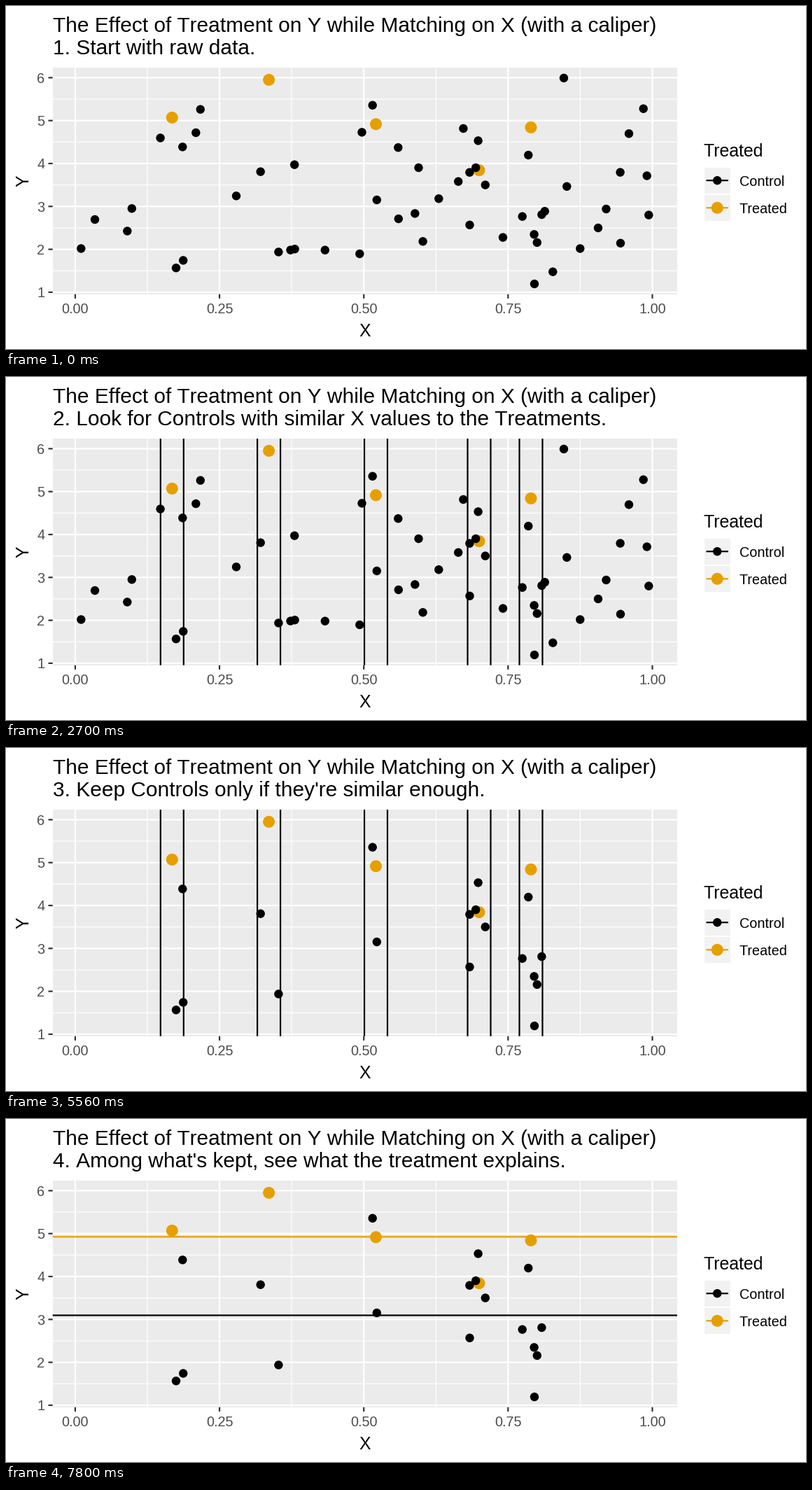
A matplotlib script for the animation above (8 s loop, 1143 by 490 pixels).

```python
import numpy as np
import matplotlib.pyplot as plt
from matplotlib.animation import FuncAnimation
from matplotlib.collections import PatchCollection
from matplotlib.patches import Circle, Rectangle

WIDTH, HEIGHT, DPI = 1143, 490, 64
STEP, LOOP = 100, 8000
PT = 72 / DPI  # points per pixel
ORANGE = "#E69F00"
LEFT, RIGHT, TOP, BOTTOM = 66.7, 958.9, 88.1, 411.7
X0, X_UNIT, Y0, Y_UNIT = 98.9, 824.6, 470.2, 61.3
CALIPER = 0.02 * X_UNIT

plt.rcParams.update({"font.family": "Liberation Sans", "text.kerning_factor": 12})

# Stage positions of the observations
treated = np.array([(237.3, 159.4), (375.6, 105.4), (528.5, 168.8),
                    (676, 234.6), (750, 173.4)])
control = np.array([
    (107.3, 346.5), (127, 305), (173.3, 321.5), (179.8, 289.3), (220.6, 188.5),
    (252.3, 201.3), (271.3, 181), (277.8, 147.7), (243, 374.2), (253.2, 363.4),
    (329, 271.3), (363.7, 236.7), (412.2, 226.7), (389.4, 351.4), (406.5, 348.6),
    (412.6, 347.2), (455.8, 348.7), (505.3, 354), (508.5, 180.4), (523.7, 141.8),
    (529.8, 277), (560.3, 202.2), (560.8, 304), (584.3, 296.4), (589.5, 231),
    (595.6, 336.3), (618.3, 275.2), (646.2, 250.7), (653.4, 175), (662.4, 237.7),
    (662.5, 312.8), (671.2, 231), (674.6, 192.4), (684.8, 255.6), (710, 330.6),
    (737.7, 300.7), (746.3, 213), (754.6, 326.3), (758.8, 337.9), (755, 397),
    (765.4, 298), (769.8, 293.2), (781.3, 379.7), (797, 102.9), (801.3, 257.8),
    (820.3, 346.5), (846, 317), (857.5, 290), (877.6, 237.6), (878, 338.8),
    (890, 182.3), (910.7, 146.7), (915.7, 242.5), (918.3, 298.6)])
distance = np.abs(control[:, :1] - treated[:, 0]).min(axis=1)
kept = distance < CALIPER

fig = plt.figure(figsize=(WIDTH / DPI, HEIGHT / DPI), dpi=DPI, facecolor="white")
ax = fig.add_axes([0, 0, 1, 1])
ax.set(xlim=(0, WIDTH), ylim=(HEIGHT, 0))
ax.axis("off")


def box(x0, y0, x1, y1, color):
    ax.add_patch(Rectangle((x0, y0), x1 - x0, y1 - y0, fc=color, lw=0, zorder=0))


def line(x0, y0, x1, y1, color, width=2.2, zorder=2):
    return ax.plot([x0, x1], [y0, y1], color=color, lw=width * PT, zorder=zorder,
                   solid_capstyle="butt", snap=False)[0]


def text(x, y, label, size, color="black", ha="left", rotation=0):
    return ax.text(x, y, label, fontsize=size * PT, color=color, ha=ha, va="baseline",
                   rotation=rotation, rotation_mode="anchor")


def dots(points, diameter, color, zorder):
    circles = [Circle(p, diameter / 2) for p in points]
    return ax.add_collection(
        PatchCollection(circles, fc=color, ec="none", zorder=zorder), autolim=False)


def control_dots(points):
    return dots(points, 12.4, "black", 4)


def treated_dots(points):
    return dots(points, 17, ORANGE, 3)


# Panel, grid and axes
box(LEFT, TOP, RIGHT, BOTTOM, "#EBEBEB")
for i in range(4):
    x = X0 + (0.125 + 0.25 * i) * X_UNIT
    line(x, TOP, x, BOTTOM, "white", 1.2, 1)
for i in range(1, 6):
    y = Y0 - (i + 0.5) * Y_UNIT
    line(LEFT, y, RIGHT, y, "white", 1.2, 1)
for i in range(5):
    x = X0 + 0.25 * i * X_UNIT
    line(x, TOP, x, BOTTOM, "white")
    line(x, BOTTOM, x, BOTTOM + 6.2, "#333333")
    text(x, 439, f"{0.25 * i:.2f}", 19.9, "#4D4D4D", "center")
for i in range(1, 7):
    y = Y0 - i * Y_UNIT
    line(LEFT, y, RIGHT, y, "white")
    line(LEFT - 6.2, y, LEFT, y, "#333333")
    text(55.2, y + 7.3, str(i), 19.9, "#4D4D4D", "right")
text((LEFT + RIGHT) / 2, 472, "X", 24.9, ha="center")
text(32, (TOP + BOTTOM) / 2, "Y", 24.9, ha="center", rotation=90)

# Legend
text(996.6, 215, "Treated", 24.9)
for y, label, color, key_dots in ((249.2, "Control", "black", control_dots),
                                  (288.3, "Treated", ORANGE, treated_dots)):
    box(997.8, y - 18.4, 1034.6, y + 18.4, "#F2F2F2")
    line(1000.5, y, 1031.9, y, color)
    key_dots([(1016.2, y)])
    text(1048, y + 7.6, label, 19.9)

# Title and data
text(66.7, 37, "The Effect of Treatment on Y while Matching on X (with a caliper)", 29.86)
subtitle = text(66.7, 69, "", 29.86)
treated_dots(treated)
control_dots(control[kept])
dropped = control_dots(control[~kept])
calipers = [line(x + side, TOP, x + side, BOTTOM, "black", zorder=5)
            for x in treated[:, 0] for side in (-CALIPER, CALIPER)]
means = [line(LEFT, y, RIGHT, y, color, zorder=5)
         for y, color in ((treated[:, 1].mean(), ORANGE),
                          (control[kept, 1].mean(), "black"))]

STEPS = ((0, "1. Start with raw data."),
         (500, "2. Look for Controls with similar X values to the Treatments."),
         (3700, "3. Keep Controls only if they're similar enough."),
         (6800, "4. Among what's kept, see what the treatment explains."))


def draw(frame):
    t = frame * STEP
    subtitle.set_text([label for start, label in STEPS if t >= start][-1])
    dropped.set_visible(t < 3700)
    for caliper in calipers:
        caliper.set_visible(1200 <= t < 6800)
    for mean in means:
        mean.set_visible(t >= 7800)
    return [subtitle, dropped, *calipers, *means]


anim = FuncAnimation(fig, draw, frames=LOOP // STEP, interval=STEP,
                     repeat=True, repeat_delay=0, blit=False)
plt.show()
```
